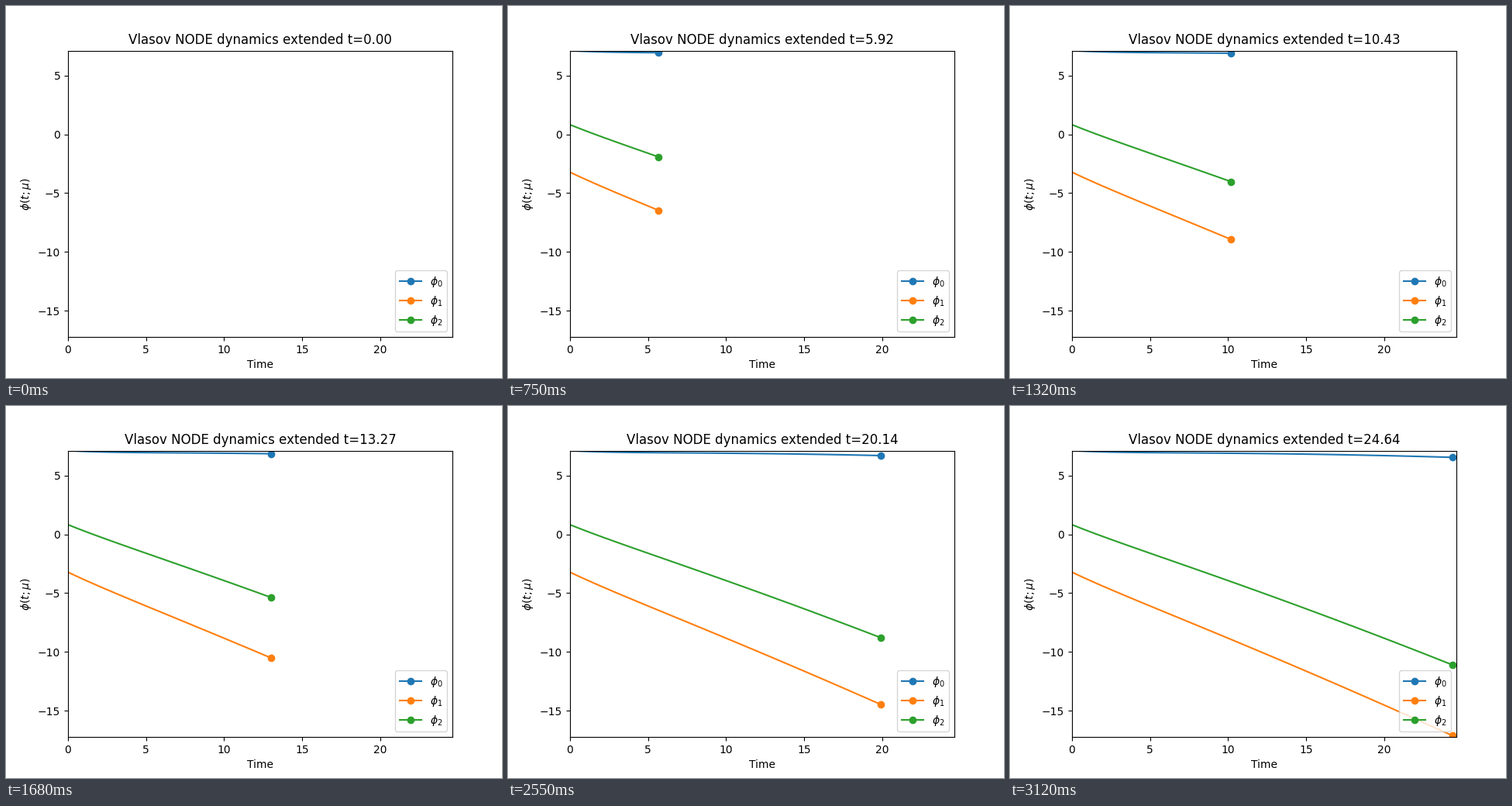
A matplotlib script that plays this animation: 640 px wide and 480 px high, repeating every 3150 ms.

```python
import numpy as np
import matplotlib.pyplot as plt
from matplotlib.animation import FuncAnimation

FRAMES = 105
DT = 0.23695
TAU = 2.5
time = DT * np.arange(FRAMES)


def drift(start, drop, slope, bend):
    """A short initial decay on top of a gently bending line."""
    decay = drop * (1 - np.exp(-time / TAU))
    return start - decay + slope * time - bend * time**2


curves = [
    drift(7.12, 0.22, 0.0095, 0.00098),
    drift(-3.22, 0.30, -0.514, 0.0018),
    drift(0.82, 0.27, -0.4285, 0.00203),
]

fig, ax = plt.subplots(figsize=(6.4, 4.8), dpi=100)
ax.set_xlim(0, time[-1])
ax.set_ylim(-17.25, 7.12)
ax.set_xlabel("Time")
ax.set_ylabel(r"$\phi(t;\mu)$")
title = ax.set_title("")
lines = [
    ax.plot([], [], marker="o", markevery=[-1], label=rf"$\phi_{k}$")[0]
    for k in range(len(curves))
]
ax.legend(loc="lower right")


def update(i):
    for line, curve in zip(lines, curves):
        line.set_data(time[:i], curve[:i])
        line.set_markevery([-1] if i else None)
    title.set_text(f"Vlasov NODE dynamics extended t={time[i]:.2f}")
    return [*lines, title]


anim = FuncAnimation(fig, update, frames=FRAMES, interval=30,
                     repeat=True, repeat_delay=0, blit=False)
plt.show()
```
